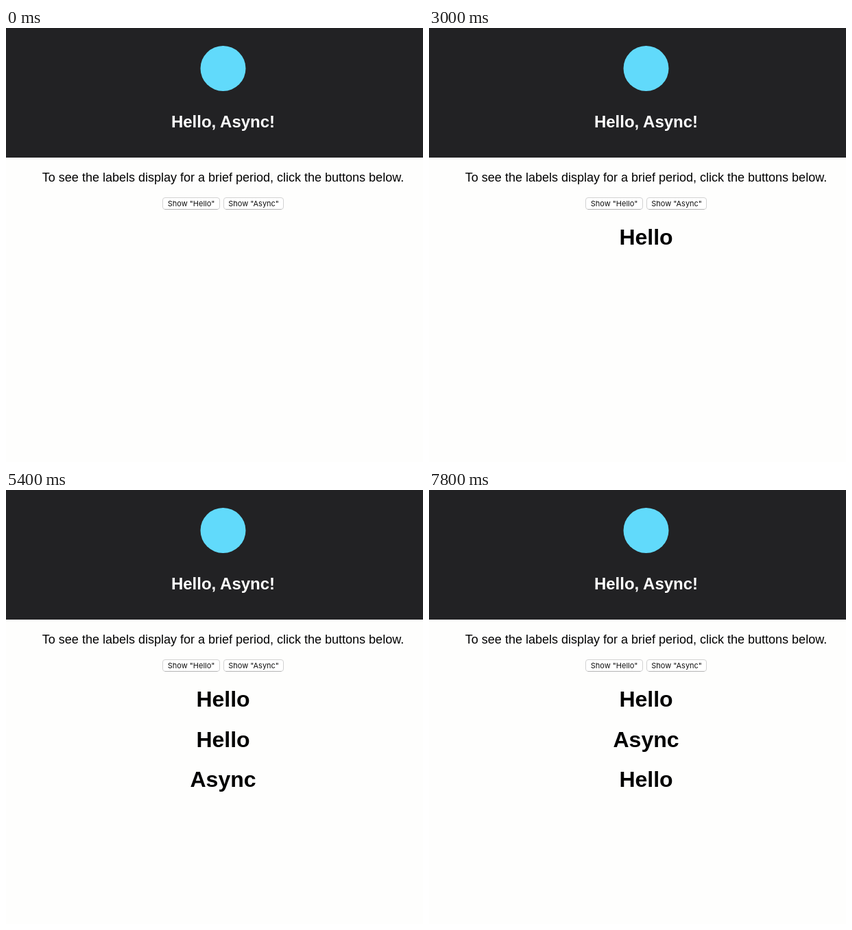
Recreate the animation shown at these times as an HTML page. Size 608 px wide and 633 px high, loop 8 s.

```html
<!DOCTYPE html>
<html lang="en">
<head>
<meta charset="utf-8">
<title>Hello, Async!</title>
<style>
  html, body { margin: 0; width: 100%; height: 100%; overflow: hidden; background: #fefefd; }
  svg { display: block; width: 608px; height: 633px; }
  text { font-family: "Liberation Sans", Arial, sans-serif; text-anchor: middle; fill: #000; }
  .title { font-size: 24px; font-weight: bold; fill: #fff; }
  .intro { font-size: 18px; }
  .button rect { fill: #fff; stroke: #d2d2d2; }
  .button path { stroke: #b4b4b4; }
  .button text { font: 11px Inter, sans-serif; fill: #111; }
  .label { font-size: 32px; font-weight: bold; }
</style>
</head>
<body>
<svg viewBox="0 0 608 633">
  <rect width="608" height="633" fill="#fefefd"/>
  <rect width="608" height="189" fill="#222224"/>
  <circle cx="316.5" cy="59" r="33" fill="#61dafb"/>
  <text class="title" x="316.5" y="145">Hello, Async!</text>
  <text class="intro" x="316.5" y="224">To see the labels display for a brief period, click the buttons below.</text>
  <g class="button">
    <rect x="228.5" y="247.5" width="83" height="17" rx="3.5"/>
    <path d="M231.5 264.5h77"/>
    <text x="270" y="260">Show "Hello"</text>
  </g>
  <g class="button">
    <rect x="317.5" y="247.5" width="87" height="17" rx="3.5"/>
    <path d="M320.5 264.5h81"/>
    <text x="361" y="260">Show "Async"</text>
  </g>
  <g id="labels"></g>
</svg>
<script>
  const LOOP = 8000, LIFETIME = 5000;
  const FIRST_BASELINE = 316, ROW_HEIGHT = 58.6;
  const clicks = [
    { text: 'Hello', time: 1800 },
    { text: 'Hello', time: 3200 },
    { text: 'Async', time: 4400 },
    { text: 'Hello', time: 5600 },
  ];

  const group = document.getElementById('labels');
  for (const click of clicks) {
    click.node = document.createElementNS(group.namespaceURI, 'text');
    click.node.textContent = click.text;
    click.node.setAttribute('class', 'label');
    click.node.setAttribute('x', 316.5);
    group.append(click.node);
  }

  // Expired labels leave the stack and the remaining ones move up.
  function render() {
    const now = performance.now() % LOOP;
    let row = 0;
    for (const { node, time } of clicks) {
      const visible = now >= time && now < time + LIFETIME;
      node.style.display = visible ? '' : 'none';
      if (visible) node.setAttribute('y', Math.round(FIRST_BASELINE + ROW_HEIGHT * row++));
    }
    requestAnimationFrame(render);
  }
  render();
</script>
</body>
</html>
```
